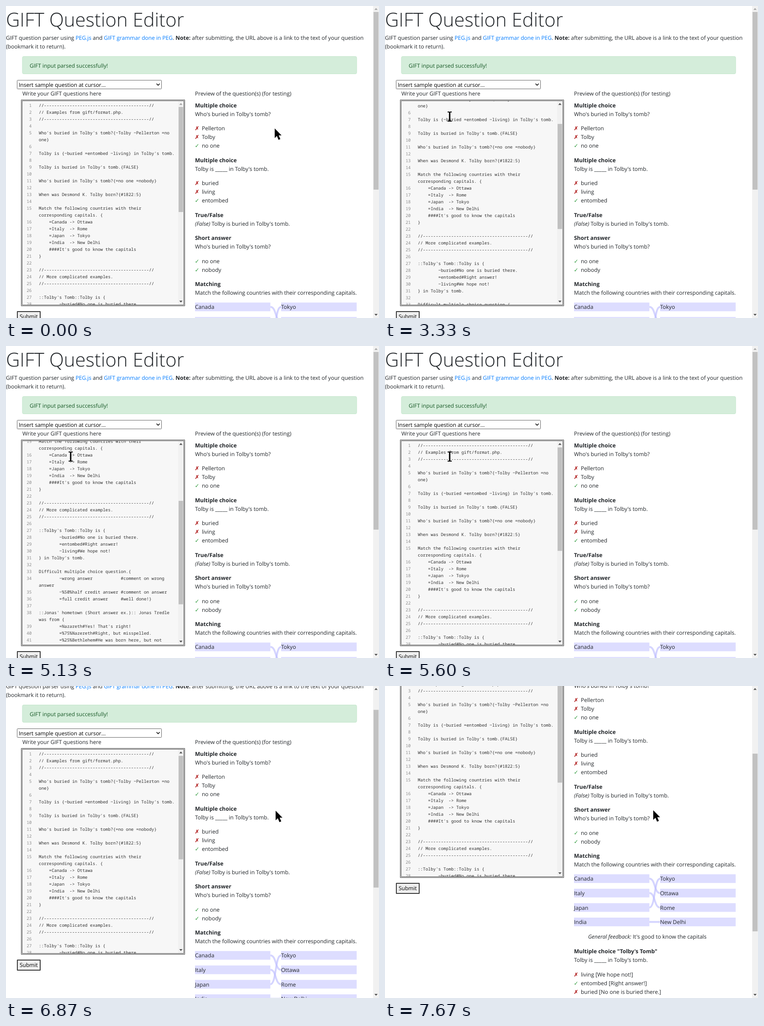
An HTML page with a canvas for the animation above (8000 ms loop, 819 px wide and 683 px high).

```html
<!DOCTYPE html>
<html lang="en">
<head>
<meta charset="utf-8">
<title>GIFT Question Editor</title>
<style>
  html, body { margin: 0; width: 100%; height: 100%; overflow: hidden; background: #fff; }
  canvas { display: block; }
</style>
</head>
<body>
<canvas id="stage" width="819" height="683"></canvas>
<script>
const ctx = document.getElementById('stage').getContext('2d');
const LOOP = 8000, TICK = 200 / 3, NOTCH = 79;
const SANS = '"Open Sans", "Noto Sans", sans-serif';
const MONO = '9.4px "Noto Sans Mono", "DejaVu Sans Mono", monospace';
const INK = '#212529', LINK = '#007bff';

const rule = '//' + '-'.repeat(41) + '//';
const source = `${rule}
// Examples from gift/format.php.
${rule}

Who's buried in Tolby's tomb?{~Tolby ~Pellerton =no one}

Tolby is {~buried =entombed ~living} in Tolby's tomb.

Tolby is buried in Tolby's tomb.{FALSE}

Who's buried in Tolby's tomb?{=no one =nobody}

When was Desmond K. Tolby born?{#1822:5}

Match the following countries with their corresponding capitals. {
    =Canada -> Ottawa
    =Italy  -> Rome
    =Japan  -> Tokyo
    =India  -> New Delhi
    ####It's good to know the capitals
}

${rule}
// More complicated examples.
${rule}

::Tolby's Tomb::Tolby is {
        ~buried#No one is buried there.
        =entombed#Right answer!
        ~living#We hope not!
} in Tolby's tomb.

Difficult multiple choice question.{
        ~wrong answer           #comment on wrong answer
        ~%50%half credit answer #comment on answer
        =full credit answer     #well done!}

::Jonas' hometown (Short answer ex.):: Jonas Tredle was from {
        =Nazareth#Yes! That's right!
        =%75%Nazereth#Right, but misspelled.
        =%25%Bethlehem#He was born here, but not raised here.}`;

// Soft-wrapped rows; only the first row of a line carries its number
const rows = source.split('\n').flatMap((line, i) =>
  (line.match(/.{1,53}(\s|$)/g) || ['']).map((text, j) => ({ text, num: j ? '' : i + 1 })));

// Preview: [kind, y, text]; h heading, p text, x wrong, v right
const preview = [
  ['p', 191.5, 'Preview of the question(s) (for testing)'],
  ['h', 217, 'Multiple choice'],
  ['p', 236, "Who's buried in Tolby's tomb?"],
  ['x', 267.5, 'Pellerton'], ['x', 286.5, 'Tolby'], ['v', 305.5, 'no one'],
  ['h', 337, 'Multiple choice'],
  ['p', 356, "Tolby is _____ in Tolby's tomb."],
  ['x', 387.5, 'buried'], ['x', 406.5, 'living'], ['v', 425.5, 'entombed'],
  ['h', 457, 'True/False'],
  ['h', 507.5, 'Short answer'],
  ['p', 526.5, "Who's buried in Tolby's tomb?"],
  ['v', 558, 'no one'], ['v', 577, 'nobody'],
  ['h', 608.5, 'Matching'],
  ['p', 627.5, 'Match the following countries with their corresponding capitals.'],
  ['h', 817, 'Multiple choice "Tolby\'s Tomb"'],
  ['p', 836, "Tolby is _____ in Tolby's tomb."],
  ['x', 868, 'living [We hope not!]'],
  ['v', 887, 'entombed [Right answer!]'],
  ['x', 906, 'buried [No one is buried there.]']
];
const pairs = [['Canada', 'Tokyo', 1], ['Italy', 'Ottawa', 2], ['Japan', 'Rome', 0], ['India', 'New Delhi', 3]];

const clamp = v => Math.max(0, Math.min(1, v));
const ease = v => { v = clamp(v); return v * v * (3 - 2 * v); };
const notches = (t, starts) => starts.reduce((sum, s) => sum + NOTCH * ease((t - s) / 180), 0);

const editorScroll = t => notches(t, [3180, 3450, 3850]) - notches(t, [5112, 5250, 5400]);
const pageScroll = t => notches(t, [6727, 6915, 7185]);

// Pointer moves: start, end, control point, target
const moves = [
  [933, 1800, 400, 490, 183, 219],
  [1800, 2000, 169, 191, 155, 164],
  [2067, 2400, 146, 196, 141, 247],
  [2400, 2533, 141, 245, 141, 243],
  [2860, 2866, 142, 242, 142, 242],
  [6133, 6800, 360, 270, 592, 273],
  [6867, 7000, 591, 273, 590, 272],
  [7533, 7667, 589, 272, 589, 272]
];
function pointer(t) {
  let x = 590, y = 268;
  for (const [a, b, cx, cy, ex, ey] of moves) {
    if (t < a) break;
    const p = ease((t - a) / (b - a)), q = 1 - p;
    x = q * q * x + 2 * q * p * cx + p * p * ex;
    y = q * q * y + 2 * q * p * cy + p * p * ey;
  }
  return { x, y };
}
const inside = (p, x0, y0, x1, y1) => p.x >= x0 && p.x <= x1 && p.y >= y0 && p.y <= y1;

function rect(x, y, w, h, fill) {
  ctx.fillStyle = fill;
  ctx.fillRect(x, y, w, h);
}
function box(x, y, w, h, r, fill, stroke) {
  ctx.beginPath();
  ctx.roundRect(x + .5, y + .5, w - 1, h - 1, r);
  ctx.fillStyle = fill;
  ctx.fill();
  ctx.lineWidth = 1;
  ctx.strokeStyle = stroke;
  ctx.stroke();
}
function poly(points, fill) {
  ctx.beginPath();
  points.forEach(([x, y]) => ctx.lineTo(x, y));
  ctx.fillStyle = fill;
  ctx.fill();
}
// Draws text by the middle of its line and returns where it ends
function say(text, x, mid, color = INK, style = '') {
  ctx.font = `${style} 12px ${SANS}`;
  ctx.fillStyle = color;
  ctx.fillText(text, x, Math.round(mid + 4.6));
  return x + ctx.measureText(text).width;
}
function triangle(x, y, dir, color) {
  poly([[x - 3.5, y + 2 * dir], [x + 3.5, y + 2 * dir], [x, y - 2 * dir]], color);
}
function scrollbar(x, y, w, h, top, len, atTop) {
  rect(x, y, w, h, '#f1f1f1');
  rect(x + 1, top, w - 2, len, '#c1c1c1');
  triangle(x + w / 2, y + 6.5, 1, atTop ? '#a3a3a3' : '#505050');
  triangle(x + w / 2, y + h - 7, -1, '#505050');
}

function header(hover) {
  ctx.font = `300 42px ${SANS}`;
  ctx.fillStyle = INK;
  ctx.fillText('GIFT Question Editor', 0, 44.5);
  let x = say('GIFT question parser using ', 0, 69);
  x = say('PEG.js', x, 69, LINK);
  x = say(' and ', x, 69);
  x = say('GIFT grammar done in PEG', x, 69, LINK);
  x = say('. ', x, 69);
  x = say('Note:', x, 69, INK, 'bold');
  say(' after submitting, the URL above is a link to the text of your question', x, 69);
  say('(bookmark it to return).', 0, 88);

  box(35.5, 110, 735, 39, 3, '#d4edda', '#c3e6cb');
  say('GIFT input parsed successfully!', 52, 130, '#155724');

  box(24, 162, 318, 20, 1, '#fff', hover ? '#222' : '#666');
  say('Insert sample question at cursor...', 28, 172, '#000');
  ctx.beginPath();
  ctx.moveTo(330.5, 170);
  ctx.lineTo(334, 173.5);
  ctx.lineTo(337.5, 170);
  ctx.lineWidth = 1.7;
  ctx.strokeStyle = '#111';
  ctx.stroke();
  say('Write your GIFT questions here', 36, 191.5);
}

function editor(t) {
  const scroll = editorScroll(t), grown = t > 3500;
  box(33, 205, 360, 452, 0, '#fff', '#444');
  box(35, 207, 356, 448, 0, '#f7f7f7', '#444');
  ctx.save();
  ctx.beginPath();
  ctx.rect(36, 208, 354, 446);
  ctx.clip();
  ctx.font = MONO;
  rows.forEach(({ text, num }, i) => {
    const y = Math.round(221 + i * 15 - scroll);
    if (y < 200 || y > 670) return;
    ctx.fillStyle = '#333';
    ctx.fillText(text, 72, y);
    ctx.textAlign = 'right';
    ctx.fillStyle = '#8c8c8c';
    ctx.fillText(num, 56.5, y);
    ctx.textAlign = 'left';
  });
  scrollbar(378, 208, 12, 446, (grown ? 222 : 221) + scroll / 2, grown ? 226.5 : 230, t < 3190);
  ctx.restore();

  box(24, 668, 52, 24, 0, '#efefef', '#222');
  ctx.strokeStyle = '#555';
  ctx.strokeRect(25.5, 669.5, 49, 21);
  say('Submit', 30, 679.5, '#000');
}

function matching() {
  const mid = i => 658.7 + i * 31.6;
  pairs.forEach(([left, right, to], i) => {
    const y = mid(i), end = mid(to);
    rect(415, y - 9.5, 165.5, 19, '#ddf');
    rect(604, y - 9.5, 166, 19, '#ddf');
    ctx.beginPath();
    ctx.moveTo(580.5, y);
    ctx.bezierCurveTo(594, y, 590.5, end, 604, end);
    ctx.lineWidth = 4;
    ctx.strokeStyle = 'rgba(190,190,255,.65)';
    ctx.stroke();
    say(left, 415, y);
    say(right, 604, y);
  });
}

function questions() {
  for (const [kind, y, text] of preview) {
    if (kind === 'h') say(text, 415, y, INK, 'bold');
    else if (kind === 'p') say(text, 415, y);
    else {
      const wrong = kind === 'x';
      ctx.font = '12px "DejaVu Sans", sans-serif';
      ctx.fillStyle = wrong ? '#a60000' : '#2f9a3c';
      ctx.fillText(wrong ? '\u2717' : '\u2713', 414.5, Math.round(y + 4.6));
      say(text, 430, y);
    }
  }
  const x = say('(False)', 415, 476, INK, 'italic');
  say(" Tolby is buried in Tolby's tomb.", x, 476);
  matching();
  const end = say('General feedback:', 446, 785, INK, 'italic');
  say(" It's good to know the capitals", end, 785);
}

function drawPointer({ x, y }, beam) {
  ctx.save();
  ctx.translate(x, y);
  if (beam) {
    rect(-1.5, -10, 3, 21, '#000');
    for (const edge of [-11, 9]) {
      rect(-4.5, edge, 4, 2, '#000');
      rect(.5, edge, 4, 2, '#000');
    }
  } else {
    poly([[0, 0], [0, 21], [4.8, 16.6], [8.4, 25], [12.4, 23.2], [8.8, 15.2], [15, 15.2]], '#000');
  }
  ctx.restore();
}

function draw(t) {
  const scroll = pageScroll(t), at = pointer(t);
  ctx.textRendering = 'geometricPrecision';
  rect(0, 0, 819, 683, '#fff');
  ctx.save();
  ctx.translate(0, -Math.round(scroll));
  header(inside(at, 24, 162, 342, 182));
  editor(t);
  questions();
  ctx.restore();
  scrollbar(806, 0, 13, 683, 13 + scroll * .57, 389, scroll < 1);
  drawPointer(at, inside(at, 35, 207, 378, 655));
}

function loop() {
  const t = performance.now() % LOOP;
  draw(Math.floor((t + 3.4) / TICK) * TICK);
  requestAnimationFrame(loop);
}
loop();
</script>
</body>
</html>
```
